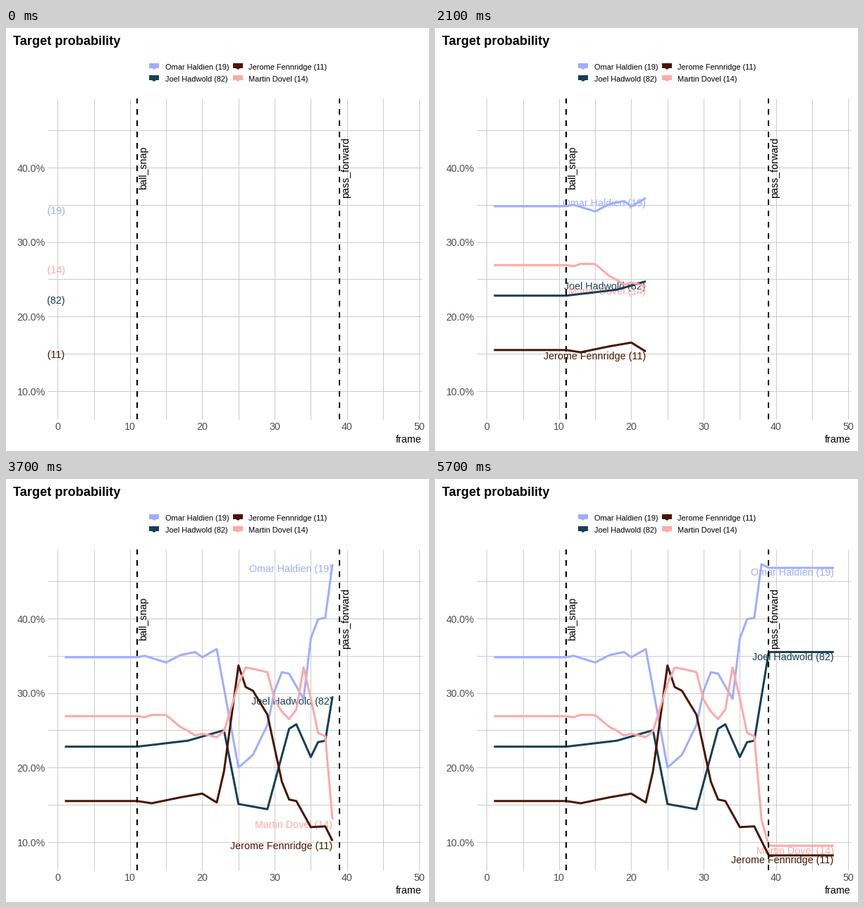
A matplotlib script for the animation above (5.8 s loop, 600 by 600 pixels).

```python
import matplotlib.pyplot as plt
import numpy as np
from matplotlib.animation import FuncAnimation
from matplotlib.patches import Polygon, Rectangle

SIZE, DPI = 600, 100
LEFT, RIGHT, TOP, BOTTOM = 59, 590, 100, 555   # panel edges in pixels
X0, UNIT = 73.25, 10.26                        # pixel of x = 0, pixels per step
Y10, PCT = 514.9, 10.567                       # pixel of 10 %, pixels per percent
SNAP, PASS, LAST = 11, 39, 48
STEPS = 58

PLAYERS = [
    ("Omar Haldien (19)", "#9fadff"),
    ("Joel Hadwold (82)", "#173f55"),
    ("Jerome Fennridge (11)", "#4a1500"),
    ("Martin Dovel (14)", "#ffa8a8"),
]

# Turning points (step, percent) of the first three players;
# the last one gets whatever is left of 100 %.
TURNS = [
    [(11, 34.8), (12, 35), (15, 34.1), (17, 35.1), (19, 35.5), (20, 34.8),
     (22, 35.9), (25, 20), (27, 21.7), (29, 25.7), (30, 30.3), (31, 32.8),
     (32, 32.6), (34, 29.2), (35, 37.3), (36, 39.9), (37, 40.1), (38, 47.3),
     (39, 46.8)],
    [(11, 22.8), (18, 23.6), (23, 25), (25, 15.1), (29, 14.4), (32, 25.2),
     (33, 25.8), (35, 21.4), (36, 23.4), (37, 23.6), (39, 35.5)],
    [(11, 15.5), (13, 15.2), (17, 16), (20, 16.5), (22, 15.3), (23, 19.5),
     (25, 33.7), (26, 30.8), (27, 30.3), (29, 27.1), (31, 18.1), (32, 15.7),
     (33, 15.5), (35, 12), (37, 12.1), (39, 8.2)],
]

plt.rcParams["font.family"] = "Liberation Sans"


def pt(px):
    return px * 72 / DPI


def px_x(step):
    return X0 + UNIT * step


def px_y(percent):
    return Y10 - PCT * (percent - 10)


fig = plt.figure(figsize=(SIZE / DPI, SIZE / DPI), dpi=DPI, facecolor="white")
ax = fig.add_axes([0, 0, 1, 1])
ax.set(xlim=(0, SIZE), ylim=(SIZE, 0))
ax.axis("off")
panel = Rectangle((LEFT, TOP), RIGHT - LEFT, BOTTOM - TOP, fill=False, lw=0)
ax.add_patch(panel)


def write(x, y, s, px=14.2, **kw):
    return ax.text(x, y, s, fontsize=pt(px), va="baseline", **kw)


def stroke(xs, ys, color, px, **kw):
    return ax.plot(xs, ys, color=color, lw=pt(px), solid_capstyle="butt", **kw)[0]


# Grid and axis labels
for step in range(0, 51, 5):
    x = px_x(step)
    stroke([x, x], [TOP, BOTTOM], "#cbcbcb", 1, zorder=1)
    if step % 10 == 0:
        write(x, 570, str(step), color="#4d4d4d", ha="center")
for percent in range(10, 46, 5):
    y = px_y(percent)
    stroke([LEFT, RIGHT], [y, y], "#cbcbcb", 1, zorder=1)
    if percent % 10 == 0:
        write(56, y + 5.7, f"{percent:.1f}%", color="#4d4d4d", ha="right")
write(590, 588, "frame", ha="right")
write(10, 24, "Target probability", 18.1, weight="bold")

# Legend
for i, (name, color) in enumerate(PLAYERS):
    x, y = (203, 322)[i // 2], (50, 67)[i % 2]
    ax.add_patch(Rectangle((x, y), 14, 7, color=color, lw=0))
    ax.add_patch(Polygon([(x + 4, y + 7), (x + 10, y + 7), (x + 7, y + 9)],
                         color=color, lw=0))
    write(x + 22.5, y + 9, name, 11)

# Event markers
for step, name in ((SNAP, "ball_snap"), (PASS, "pass_forward")):
    x = px_x(step)
    stroke([x, x], [BOTTOM, TOP], "black", 2, ls=(0, (4, 4)), zorder=5)
    write(x + 13, px_y(40), name, 14.3, rotation=90, ha="center",
          rotation_mode="anchor", zorder=5)

# Probability curves with their moving labels
steps = np.arange(1, LAST + 1)
shares = [np.interp(steps, *zip(*turns)) for turns in TURNS]
shares.append(100 - sum(shares))
curves = []
for (name, color), share in zip(PLAYERS, shares):
    line = stroke([], [], color, 3, zorder=4)
    label = write(0, 0, name, color=color, ha="right", zorder=3, clip_on=True)
    label.set_clip_path(panel)
    curves.append((px_y(share), line, label))


def draw(i):
    n = min(i + 1, LAST)
    xs = px_x(steps[:n])
    for ys, line, label in curves:
        line.set_data(xs, ys[:n])
        label.set_position((xs[-1], ys[n - 1] + 11.4))
    return [artist for curve in curves for artist in curve[1:]]


anim = FuncAnimation(fig, draw, frames=STEPS, interval=100, repeat=True,
                     repeat_delay=0, blit=False)
plt.show()
```
